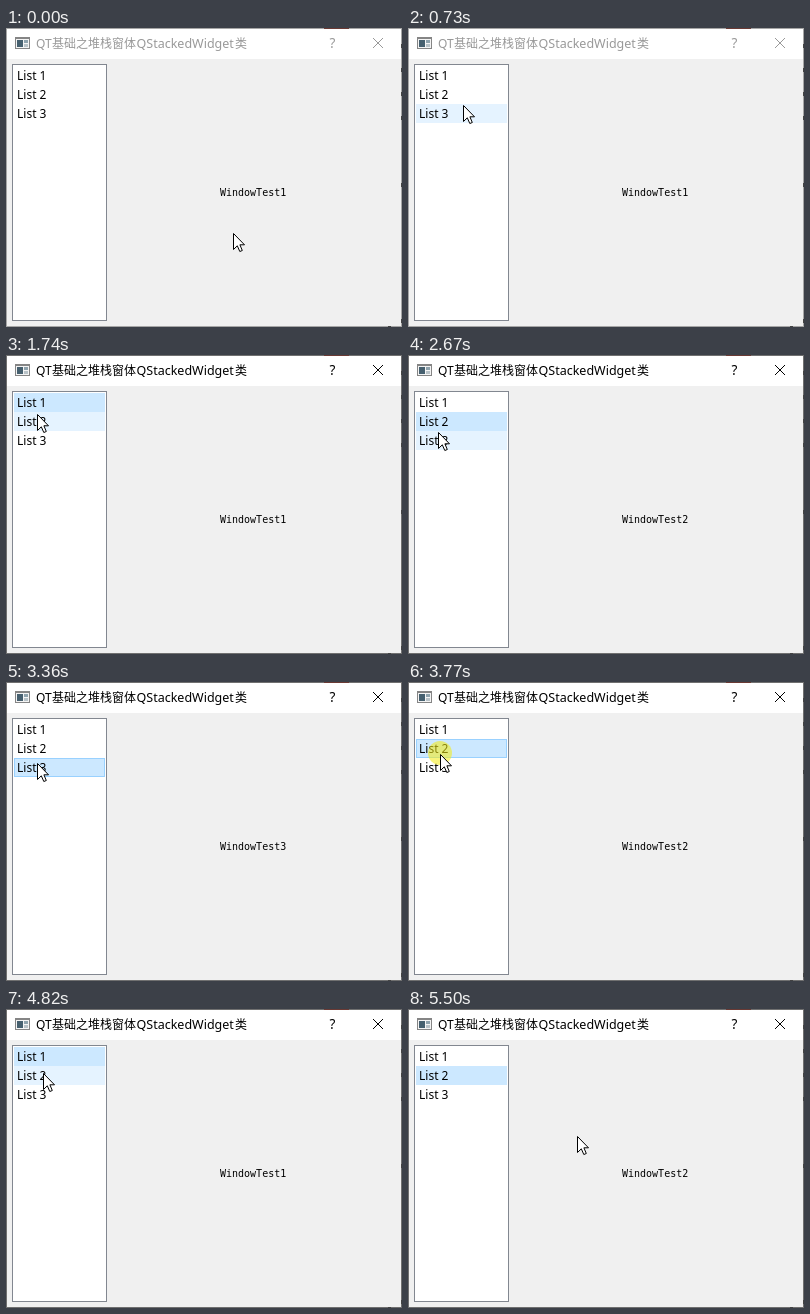
An HTML page with a canvas for the animation above (5.77 s loop, 396 px wide and 299 px high).

```html
<!DOCTYPE html>
<html lang="zh">
<head>
<meta charset="utf-8">
<title>QStackedWidget</title>
<style>
html, body { margin: 0; width: 100%; height: 100%; overflow: hidden; background: #f0f0f0; }
canvas { display: block; width: 396px; height: 299px; }
</style>
</head>
<body>
<canvas id="stage" width="396" height="299"></canvas>
<script>
const ctx = document.getElementById('stage').getContext('2d');
const LOOP = 5770;
const UI = '"Noto Sans", "Open Sans", sans-serif';
const CJK = '"Noto Sans CJK SC", "Noto Sans CJK", "Noto Sans CJK JP", sans-serif';
const MONO = '"DejaVu Sans Mono", "Liberation Mono", monospace';

const LIST = { x: 6, y: 36, w: 95, h: 257 };
const ROW = { x: 8, y: 38, w: 91, h: 19 };

// Pointer moves: first and last step in ms, step count, end point, easing
const START = [227, 205];
const linear = p => p;
const smooth = p => p * p * (3 - 2 * p);
const MOVES = [
  [130, 660, 9, 58, 82, smooth],
  [730, 730, 1, 55, 77, linear],
  [800, 1060, 5, 34, 47, linear],
  [1530, 1740, 4, 31, 59, linear],
  [2270, 2470, 4, 31, 72, linear],
  [2670, 2670, 1, 30, 77, linear],
  [2740, 2870, 3, 30, 84, linear],
  [3360, 3570, 4, 32, 72, linear],
  [3900, 4100, 3, 35, 50, linear],
  [4690, 4820, 3, 37, 64, linear],
  [5290, 5500, 4, 169, 127, smooth]
];

// Clicks: press time, end of the highlight, row chosen
const CLICKS = [
  [1130, 1200, 0],
  [1940, 2000, 1],
  [2940, 3090, 2],
  [3770, 3900, 1],
  [4360, 4430, 0],
  [5020, 5090, 1]
];

function pointerAt(t) {
  let [x, y] = START;
  for (const [from, to, steps, ex, ey, ease] of MOVES) {
    if (t < from) break;
    const gap = (to - from) / Math.max(1, steps - 1);
    const done = t >= to ? steps : Math.floor((t - from) / gap) + 1;
    const p = ease(Math.min(1, done / steps));
    x += (ex - x) * p;
    y += (ey - y) * p;
  }
  return [Math.round(x), Math.round(y)];
}

function rowAt(x, y) {
  if (x < ROW.x || x >= ROW.x + ROW.w) return -1;
  const row = Math.floor((y - ROW.y) / ROW.h);
  return row >= 0 && row < 3 ? row : -1;
}

function rect(x, y, w, h, color) {
  ctx.fillStyle = color;
  ctx.fillRect(x, y, w, h);
}

function outline(x, y, w, h, color) {
  ctx.strokeStyle = color;
  ctx.lineWidth = 1;
  ctx.strokeRect(x + 0.5, y + 0.5, w - 1, h - 1);
}

function text(str, x, y, size, family, color) {
  ctx.font = `${size}px ${family}`;
  ctx.fillStyle = color;
  ctx.fillText(str, x, y);
}

function drawIcon() {
  rect(9, 9, 15, 12, '#858585');
  rect(10, 11, 13, 9, '#f4f4f4');
  rect(11, 12, 6, 7, '#46606f');
  rect(18, 12, 4, 3, '#8fa3ad');
  rect(18, 16, 4, 3, '#b9c3c8');
}

function drawWindow(active) {
  const ink = active ? '#000' : '#999';
  rect(0, 0, 396, 299, '#f0f0f0');
  rect(0, 0, 396, 31, '#fff');
  drawIcon();
  text('QT', 30, 20, 12, UI, ink);
  text('基础之堆栈窗体', 46, 20, 12, CJK, ink);
  text('QStackedWidget', 130.5, 20, 12.5, UI, ink);
  text('类', 229, 20, 12, CJK, ink);
  text('?', 323.5, 20, 13.5, UI, ink);

  ctx.strokeStyle = ink;
  ctx.lineWidth = 1;
  ctx.beginPath();
  ctx.moveTo(367, 10);
  ctx.lineTo(377, 20);
  ctx.moveTo(377, 10);
  ctx.lineTo(367, 20);
  ctx.stroke();

  outline(0, 0, 396, 299, active ? '#707070' : '#a6a6a6');
  // Desktop showing through the translucent edge
  rect(318, 0, 25, 1, '#6b3a34');
  for (const y of [16, 40, 64, 88, 155, 291]) rect(395, y, 1, 4, '#444');
  rect(382, 298, 3, 1, '#444');
}

function drawList(selected, hover) {
  rect(LIST.x, LIST.y, LIST.w, LIST.h, '#fff');
  outline(LIST.x, LIST.y, LIST.w, LIST.h, '#828790');
  for (let i = 0; i < 3; i++) {
    const y = ROW.y + i * ROW.h;
    if (i === selected) rect(ROW.x, y, ROW.w, ROW.h, '#cce8ff');
    else if (i === hover) rect(ROW.x, y, ROW.w, ROW.h, '#e5f3ff');
    if (i === selected && i === hover) outline(ROW.x, y, ROW.w, ROW.h, '#99d1ff');
    text('List ' + (i + 1), 11, y + 14, 12, UI, '#000');
  }
}

const arrow = new Path2D('M.5 .5V16.5L4.3 12.8L6.8 18.5L9.3 17.5L6.9 11.8H11.5Z');

function drawPointer(x, y, pressed) {
  if (pressed) {
    ctx.fillStyle = 'rgba(244, 236, 20, .56)';
    ctx.beginPath();
    ctx.arc(x, y - 1, 12, 0, Math.PI * 2);
    ctx.fill();
  }
  ctx.save();
  ctx.translate(x, y);
  ctx.fillStyle = '#fff';
  ctx.strokeStyle = '#000';
  ctx.lineWidth = 1;
  ctx.fill(arrow);
  ctx.stroke(arrow);
  ctx.restore();
}

function draw(t) {
  const [x, y] = pointerAt(t);
  const last = CLICKS.filter(c => t >= c[0]).pop();
  const selected = last ? last[2] : -1;
  drawWindow(Boolean(last));
  drawList(selected, rowAt(x, y));
  text('WindowTest' + (Math.max(0, selected) + 1), 214, 168, 10, MONO, '#000');
  drawPointer(x, y, Boolean(last) && t < last[1]);
}

const begin = performance.now();
function frame() {
  draw((performance.now() - begin) % LOOP);
  requestAnimationFrame(frame);
}
frame();
</script>
</body>
</html>
```
